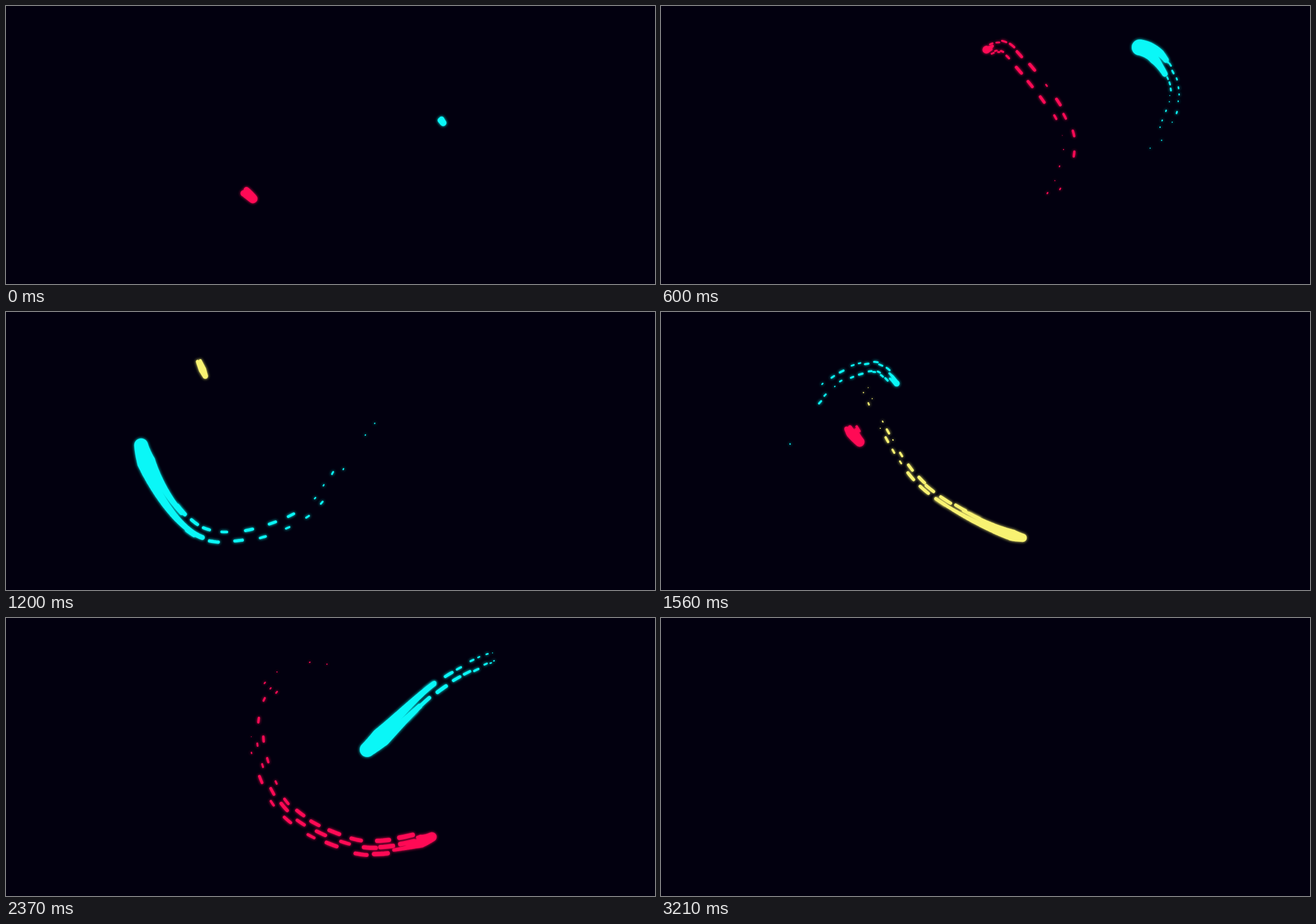
Write an HTML page with a canvas that moves like this. It is 1143 px wide and 490 px high and loops after 3270 ms.

```html
<!DOCTYPE html>
<html lang="en">
<head>
<meta charset="utf-8">
<title>Neon comets</title>
<style>
  html, body { margin: 0; width: 100%; height: 100%; overflow: hidden; background: #02000f; }
  canvas { display: block; }
</style>
</head>
<body>
<canvas id="stage" width="1143" height="490"></canvas>
<script>
const ctx = document.getElementById('stage').getContext('2d');
const LOOP = 3270, STEP = 30, BLANK = 3210;
const BACKDROP = '#02000f', RED = '#ff0a55', CYAN = '#0af7f7', YELLOW = '#f8f272';

let seed = 11;
const random = () => {
  seed = (seed * 16807) % 2147483647;
  return seed / 2147483647;
};
const clamp = (v, low, high) => Math.min(high, Math.max(low, v));

// Smooth curve through key points that are evenly spaced in time.
function curve(begin, step, points) {
  const last = points.length - 1;
  const point = i => points[clamp(i, 0, last)];
  return time => {
    const s = clamp((time - begin) / step, 0, last);
    const i = Math.min(last - 1, Math.floor(s)), u = s - i;
    return [0, 1].map(k => {
      const [a, b, c, d] = [i - 1, i, i + 1, i + 2].map(n => point(n)[k]);
      return b + u * (c - a + u * (2 * a - 5 * b + 4 * c - d + u * (3 * (b - c) + d - a))) / 2;
    });
  };
}

// A head with tapering fingers; each finger sheds shrinking drops along its own rail.
function comet({ color, radius, strands, outer, lag, born, end, begin, step, points }) {
  const at = curve(begin, step, points);
  const stop = begin + step * (points.length - 1);
  const fade = t => clamp((end - t) / 600, 0, 1) ** 0.6;
  const grow = t => clamp((t - born) / 120, 0, 1) ** 0.5;

  const fingers = Array.from({ length: strands }, (_, i) => ({
    side: outer * (1 - 2 * i / (strands - 1)) * 0.27 * strands,
    reach: 1 - 0.3 * i
  }));

  function heading(t) {
    const a = at(t - 2), b = at(t + 2), dx = b[0] - a[0], dy = b[1] - a[1];
    const d = Math.hypot(dx, dy) || 1;
    return { nx: -dy / d, ny: dx / d, speed: Math.max(0.1, d / 4) };
  }
  function beside(t, side) {
    const [x, y] = at(t), { nx, ny } = heading(t);
    return [x + nx * side, y + ny * side];
  }

  const drops = [];
  for (const { side, reach } of fingers) {
    for (let time = born + 20; time < stop - 60; time += 16 + random() * 14) {
      const { speed } = heading(time);
      drops.push({
        time, reach, speed,
        side: radius * (side * 1.1 + (random() - 0.5) * 0.3),
        life: Math.min(220 + random() * 200, end + 60 - time),
        longest: 36 * Math.min(1, speed / 1.3)
      });
    }
  }

  function drawDrop({ time, reach, speed, side, life, longest }, t) {
    const age = t - time;
    if (age < lag * fade(t) * reach * 0.8 || age <= 0 || age >= life) return;
    const length = longest * (1 - age / life);
    const width = Math.min(1.6 + length * 0.2, radius * 0.75, length + 1);
    const half = Math.max(0.1, length - width) / 2 / speed;
    ctx.lineWidth = width;
    ctx.beginPath();
    for (let i = -2; i <= 2; i++) ctx.lineTo(...beside(Math.min(t, time + half * i / 2), side));
    ctx.stroke();
  }

  function drawBody(t) {
    const r = radius * fade(t) * grow(t), head = at(t);
    ctx.beginPath();
    for (const { side, reach } of fingers) {
      for (let u = 0; u <= 1; u += 0.0125) {
        const time = Math.max(born, t - u * lag * fade(t) * reach);
        const p = at(time);
        const back = Math.hypot(p[0] - head[0], p[1] - head[1]);
        const [x, y] = beside(time, side * r * Math.min(1, back / (2.5 * r)));
        const size = r * (0.36 + 0.64 * (1 - u) ** 1.5);
        ctx.moveTo(x + size, y);
        ctx.arc(x, y, size, 0, Math.PI * 2);
      }
    }
    ctx.fill();
  }

  return t => {
    ctx.fillStyle = ctx.strokeStyle = ctx.shadowColor = color;
    for (const drop of drops) drawDrop(drop, t);
    if (t > born && t < end) drawBody(t);
  };
}

const comets = [
  comet({
    color: RED, radius: 15, strands: 2, outer: 1, lag: 100, born: -35, end: 760,
    begin: -35, step: 127,
    points: [[421, 327], [498, 382], [643, 384], [718, 240], [620, 86], [573, 77], [564, 84]]
  }),
  comet({
    color: CYAN, radius: 14, strands: 2, outer: -1, lag: 140, born: -20, end: 1680,
    begin: -120, step: 120,
    points: [
      [752, 180], [770, 206], [803, 246], [870, 235], [905, 165], [889, 108], [843, 73], [738, 86],
      [625, 215], [525, 355], [345, 390], [238, 235], [292, 132], [372, 97], [415, 126], [424, 146]
    ]
  }),
  comet({
    color: YELLOW, radius: 7.5, strands: 2, outer: 1, lag: 110, born: 1150, end: 2130,
    begin: 1080, step: 120,
    points: [
      [330, 62], [351, 113], [391, 203], [472, 315], [637, 398], [747, 370], [789, 325],
      [800, 306], [803, 298]
    ]
  }),
  comet({
    color: RED, radius: 13, strands: 3, outer: 1, lag: 75, born: 1510, end: 2650,
    begin: 1494, step: 66,
    points: [
      [330, 198], [350, 229], [400, 288], [488, 328], [597, 322], [684, 252], [686, 143], [598, 70],
      [505, 92], [450, 150], [447, 245], [500, 345], [618, 402], [728, 393], [795, 360], [830, 320],
      [845, 298], [850, 285]
    ]
  }),
  comet({
    color: CYAN, radius: 13, strands: 2, outer: 1, lag: 95, born: 2120, end: 3150,
    begin: 2100, step: 90,
    points: [
      [868, 68], [835, 78], [752, 126], [636, 232], [535, 298], [420, 304], [328, 272],
      [277, 218], [262, 185], [264, 168]
    ]
  })
];

const began = performance.now();
ctx.lineCap = ctx.lineJoin = 'round';

function draw() {
  const t = Math.floor((performance.now() - began) % LOOP / STEP) * STEP;
  ctx.shadowBlur = 0;
  ctx.fillStyle = BACKDROP;
  ctx.fillRect(0, 0, 1143, 490);
  ctx.shadowBlur = 5;
  if (t < BLANK) for (const paint of comets) paint(t);
  requestAnimationFrame(draw);
}
draw();
</script>
</body>
</html>
```
